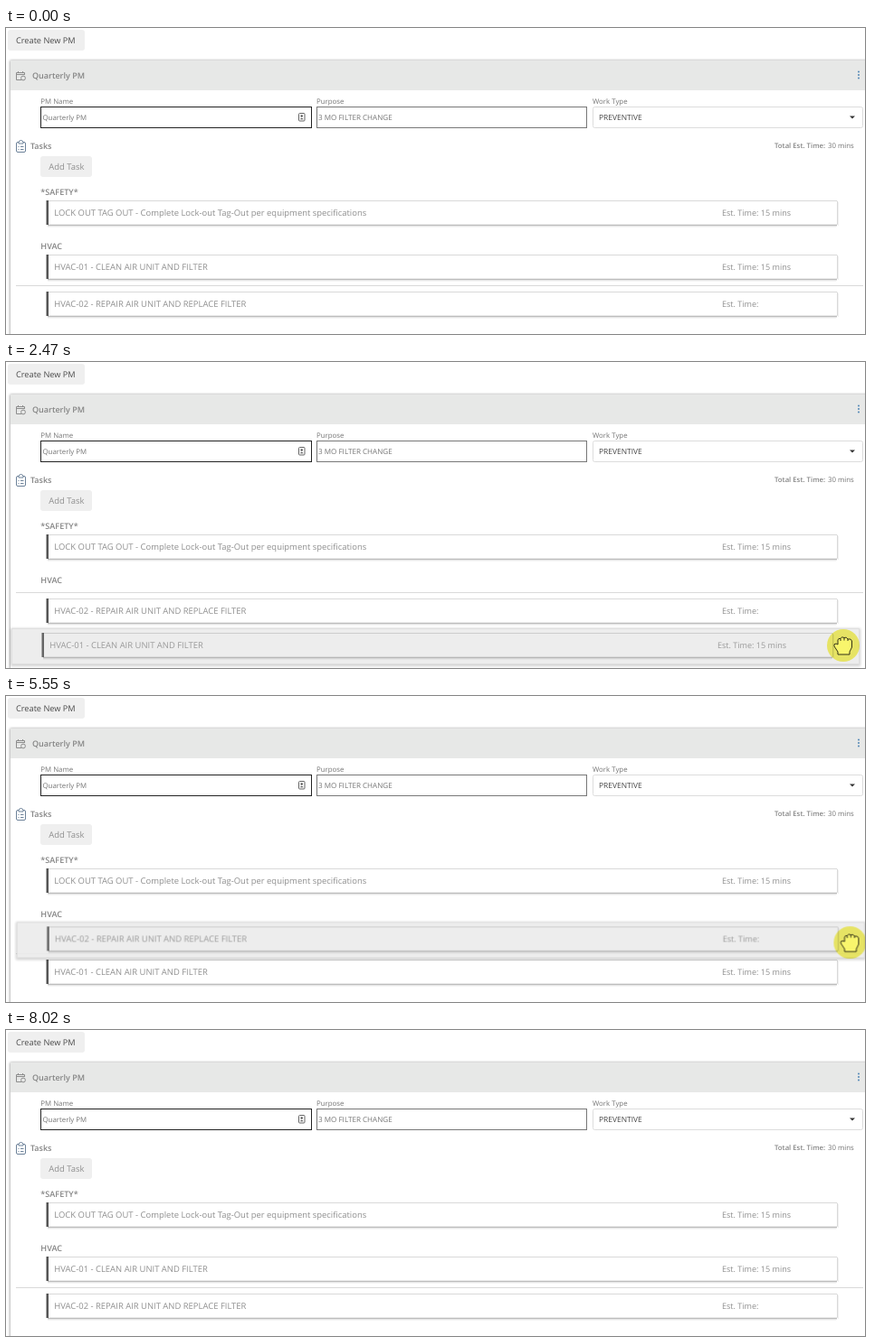
Animation, 949 px wide and 339 px high, one loop 8.11 s. Source, as an HTML page:

```html
<!DOCTYPE html>
<html lang="en">
<head>
<meta charset="utf-8">
<title>Quarterly PM</title>
<style>
html, body { margin: 0; width: 100%; height: 100%; overflow: hidden; background: #fff; }
svg { display: block; width: 949px; height: 339px; }
text { font-family: "Open Sans", "Noto Sans", sans-serif; font-size: 9.45px; fill: #8f8f8f; text-rendering: geometricPrecision; }
.b { font-weight: 600; font-size: 9.1px; fill: #858585; }
.s { font-size: 7.85px; fill: #757575; }
.est { font-size: 9.05px; }
.line { stroke: #d9d9d9; }

.anim { animation: 8.11s step-end infinite; }
#row1 { animation-name: row1; }
#row2 { animation-name: row2; }
#rule { animation-name: rule; }
#hover1 { animation-name: hover1; }
#hover2 { animation-name: hover2; }
#held { animation-name: held; }
#drag1 { animation-name: drag1; }
#drag2 { animation-name: drag2; }
#cursor { animation-name: cursor; }
#move { animation-name: move; }
#hand { animation-name: hand; }
#press { animation-name: press; mix-blend-mode: multiply; }

@keyframes row1 {
  0% { transform: translateY(0); opacity: 1; }
  21.33% { transform: translateY(40px); opacity: 0; }
  37.11% { transform: translateY(40px); opacity: 1; }
  67.57% { transform: translateY(41px); opacity: 1; }
  75.21% { transform: translateY(27px); opacity: 1; }
  75.95% { transform: translateY(11px); opacity: 1; }
  76.8% { transform: translateY(3px); opacity: 1; }
  77.55% { transform: translateY(1px); opacity: 1; }
  78.42%, 100% { transform: translateY(0); opacity: 1; }
}
@keyframes row2 {
  0% { transform: translateY(41px); opacity: 1; }
  29.59% { transform: translateY(27px); opacity: 1; }
  30.45% { transform: translateY(11px); opacity: 1; }
  31.32% { transform: translateY(3px); opacity: 1; }
  32.18% { transform: translateY(1px); opacity: 1; }
  33.04% { transform: translateY(0); opacity: 1; }
  67.57% { transform: translateY(40px); opacity: 0; }
  80.14% { transform: translateY(40px); opacity: 1; }
  98.89%, 100% { transform: translateY(41px); opacity: 1; }
}
@keyframes rule {
  0% { transform: translateY(41px); opacity: 1; }
  29.59% { transform: translateY(27px); opacity: 1; }
  30.45% { transform: translateY(11px); opacity: 1; }
  31.32% { transform: translateY(3px); opacity: 1; }
  32.18% { transform: translateY(1px); opacity: 1; }
  33.04% { transform: translateY(0); opacity: 1; }
  37.11% { transform: translateY(0); opacity: 0; }
  67.57% { transform: translateY(41px); opacity: 1; }
  75.21% { transform: translateY(27px); opacity: 1; }
  75.95% { transform: translateY(11px); opacity: 1; }
  76.8% { transform: translateY(3px); opacity: 1; }
  77.55% { transform: translateY(1px); opacity: 1; }
  78.42% { transform: translateY(0); opacity: 1; }
  80.14% { transform: translateY(0); opacity: 0; }
  98.89%, 100% { transform: translateY(41px); opacity: 1; }
}
@keyframes hover1 {
  0% { opacity: 0; }
  6.5% { opacity: 1; }
  21.33% { opacity: 0; }
  49.4% { opacity: 1; }
  67.57%, 100% { opacity: 0; }
}
@keyframes hover2 {
  0% { opacity: 0; }
  2.4% { opacity: 1; }
  6.5%, 100% { opacity: 0; }
}
@keyframes held {
  0% { opacity: 0; }
  37.11% { opacity: 1; }
  67.57% { opacity: 0; }
  80.14% { opacity: 1; }
  98.89%, 100% { opacity: 0; }
}
@keyframes drag1 {
  0% { transform: translate(0, 0); opacity: 0; }
  21.33% { transform: translate(0, 0); opacity: .9; animation-timing-function: steps(11); }
  30.45% { transform: translate(-5px, 49px); opacity: .9; }
  31.32% { transform: translate(-5px, 50px); opacity: .9; }
  37.11%, 100% { transform: translate(-5px, 50px); opacity: 0; }
}
@keyframes drag2 {
  0% { transform: translate(0, 0); opacity: 0; }
  67.57% { transform: translate(0, 0); opacity: .9; animation-timing-function: steps(8); }
  74.35% { transform: translate(6px, 35px); opacity: .9; animation-timing-function: steps(4); }
  77.56% { transform: translate(4.5px, 44px); opacity: .9; }
  80.14%, 100% { transform: translate(4.5px, 44px); opacity: 0; }
}
@keyframes cursor {
  0% { transform: translate(938px, 360px); }
  1.47% { transform: translate(938px, 335px); animation-timing-function: steps(8); }
  8.13% { transform: translate(929px, 270px); }
  13.81% { transform: translate(929px, 268px); }
  14.67% { transform: translate(929px, 265px); }
  15.53% { transform: translate(929px, 262px); }
  21.33% { transform: translate(929px, 262px); animation-timing-function: steps(11); }
  30.45% { transform: translate(925px, 314px); }
  31.32% { transform: translate(925px, 315px); }
  37.11% { transform: translate(925px, 311px); }
  46.85% { transform: translate(925px, 310px); animation-timing-function: steps(5); }
  51.04% { transform: translate(924.5px, 273.5px); animation-timing-function: steps(7); }
  56.84% { transform: translate(932px, 267px); }
  57.7% { transform: translate(931.5px, 268.5px); }
  67.57% { transform: translate(931.5px, 268.5px); animation-timing-function: steps(8); }
  74.35% { transform: translate(939px, 306px); animation-timing-function: steps(4); }
  77.56% { transform: translate(937px, 315px); }
  80.14% { transform: translate(937px, 318px); animation-timing-function: steps(4); }
  83.35%, 100% { transform: translate(942px, 362px); }
}
@keyframes move {
  0% { opacity: 1; }
  21.33% { opacity: 0; }
  37.11% { opacity: 1; }
  67.57% { opacity: 0; }
  80.14%, 100% { opacity: 1; }
}
@keyframes hand {
  0% { opacity: 0; }
  21.33% { opacity: 1; }
  37.11% { opacity: 0; }
  67.57% { opacity: 1; }
  80.14%, 100% { opacity: 0; }
}
@keyframes press {
  0% { opacity: 0; }
  19.6% { opacity: 1; }
  37.11% { opacity: 0; }
  58.44% { opacity: 1; }
  80.14%, 100% { opacity: 0; }
}
</style>
</head>
<body>
<svg viewBox="0 0 949 339">
  <defs>
    <filter id="soft" x="-5%" y="-20%" width="110%" height="150%"><feGaussianBlur stdDeviation="1.5"/></filter>
    <g id="card">
      <rect x="45.5" y="251.5" width="873" height="26.5" rx="1" fill="none" stroke="#000" stroke-opacity=".15"/>
      <path d="M46 278.5H918" stroke="#000" stroke-opacity=".2"/>
      <path d="M46 279.5H918" stroke="#000" stroke-opacity=".1"/>
      <path d="M46 280.5H917" stroke="#000" stroke-opacity=".04"/>
      <path d="M919.5 253V279" stroke="#000" stroke-opacity=".06"/>
      <rect x="44.5" y="251" width="2.5" height="27" fill="#555"/>
    </g>
    <g id="task1">
      <use href="#card"/>
      <text x="53.3" y="268.2">HVAC-01 - CLEAN AIR UNIT AND FILTER</text>
      <text class="est" x="791" y="268.2">Est. Time: 15 mins</text>
    </g>
    <g id="task2">
      <use href="#card"/>
      <text x="53.3" y="268.2">HVAC-02 - REPAIR AIR UNIT AND REPLACE FILTER</text>
      <text class="est" x="791" y="268.2">Est. Time:</text>
    </g>
    <g id="ghost">
      <rect x="10" y="246" width="939" height="42" fill="#000" opacity=".2" filter="url(#soft)"/>
      <rect x="11" y="246" width="937" height="40" fill="#ebebeb"/>
      <rect x="11.5" y="246.5" width="936" height="39" fill="none" stroke="#dcdcdc"/>
    </g>
  </defs>

  <rect width="949" height="339" fill="#fff"/>
  <rect x="2" y="2" width="85" height="23" rx="3" fill="#efefef"/>
  <text x="11" y="17.2" style="font-size:9.2px;fill:#4a4a4a">Create New PM</text>

  <!-- panel -->
  <rect x="4.5" y="36" width="960" height="320" fill="#000" opacity=".4" filter="url(#soft)"/>
  <rect x="5" y="36" width="944" height="303" fill="#fff"/>
  <rect x="5" y="36" width="944" height="33" fill="#e7e8e7"/>
  <g fill="none" stroke="#8d8d8d">
    <path d="M17 57.5H11.5V49.5H20.5V52M11.5 51.5H20.5M13.5 48V50M18.5 48V50"/>
    <circle cx="19" cy="55.5" r="2.4"/>
  </g>
  <text class="b" x="29" y="56.2" style="font-size:9px">Quarterly PM</text>
  <g fill="#4f86b5"><circle cx="942" cy="48.5" r="1"/><circle cx="942" cy="52" r="1"/><circle cx="942" cy="55.5" r="1"/></g>

  <!-- fields -->
  <text class="s" x="38.3" y="84">PM Name</text>
  <text class="s" x="343" y="84">Purpose</text>
  <text class="s" x="648" y="84">Work Type</text>
  <g fill="#fff">
    <rect x="38.5" y="87.5" width="299" height="23" stroke="#222"/>
    <rect x="343.5" y="87.5" width="298" height="23" stroke="#777"/>
    <rect x="648.5" y="87.5" width="298" height="23" rx="2" stroke="#dcdcdc"/>
  </g>
  <text class="s" x="40.5" y="101.8">Quarterly PM</text>
  <text class="s" x="345" y="101.8" style="font-size:8.1px">3 MO FILTER CHANGE</text>
  <text x="655" y="101.8" style="font-size:8.45px;fill:#444">PREVENTIVE</text>
  <path d="M932 97.5H938L935 100.5Z" fill="#333"/>
  <g fill="#555">
    <rect x="323.5" y="94.5" width="6.5" height="8.5" rx="1" fill="none" stroke="#666"/>
    <circle cx="326.7" cy="97.5" r="1.2"/><path d="M324.8 101.3Q326.7 98.2 328.6 101.3Z"/>
  </g>

  <!-- tasks -->
  <g fill="none" stroke="#6d8299">
    <rect x="11.5" y="126.5" width="10" height="11" rx="1.5"/>
    <path d="M14 126.5Q14.5 124.5 16.5 124.5T19 126.5V128H14Z" fill="#fff"/>
    <path d="M13.5 131.5H14.5M16 131.5H19.5M13.5 134.5H14.5M16 134.5H19.5"/>
  </g>
  <text class="b" x="27" y="134.2" style="font-size:9px">Tasks</text>
  <text class="b" x="849" y="133.3" style="font-size:7.75px">Total Est. Time:</text>
  <text class="s" x="908" y="133.3">30 mins</text>
  <rect x="38" y="142" width="57" height="23" rx="3" fill="#efefef"/>
  <text x="47.3" y="157.3">Add Task</text>

  <rect id="hover1" class="anim" x="11" y="245" width="936" height="40" fill="#f5f5f5"/>
  <rect id="hover2" class="anim" x="11" y="286" width="936" height="40" fill="#f5f5f5"/>
  <rect id="held" class="anim" x="11" y="285" width="936" height="40" fill="#ececec"/>

  <text class="b" x="38.3" y="185.2">*SAFETY*</text>
  <use href="#card" y="-60"/>
  <text x="53.3" y="208.2">LOCK OUT TAG OUT - Complete Lock-out Tag-Out per equipment specifications</text>
  <text class="est" x="791" y="208.2">Est. Time: 15 mins</text>
  <text class="b" x="38.3" y="245.2">HVAC</text>

  <path id="rule" class="anim line" d="M11 244.5H947"/>
  <g id="row1" class="anim"><use href="#task1"/></g>
  <g id="row2" class="anim"><use href="#task2"/></g>
  <g id="drag1" class="anim"><use href="#ghost"/><use href="#task1"/></g>
  <g id="drag2" class="anim"><use href="#ghost"/><use href="#task2"/></g>

  <g id="cursor" class="anim">
    <path id="move" class="anim" fill="#fff" stroke="#222" d="M0-17L7-10H3V-3H10V-7L17 0 10 7V3H3V10H7L0 17-7 10H-3V3H-10V7L-17 0-10-7V-3H-3V-10H-7Z"/>
    <path id="hand" class="anim" fill="#fff" stroke="#333" stroke-linejoin="round" d="M-6 10V7L-10 1Q-11-2-8-2L-6-1V-6Q-5.5-8.5-3-7.5-2-10.5 1-8.5 3.5-10 5-7 8.5-8 9.5-5V2L7 7V10ZM-3-7.5V-5M1-8.5V-5.5M5-7V-5"/>
    <circle id="press" class="anim" r="18" fill="#f8f56c"/>
  </g>
</svg>
</body>
</html>
```
